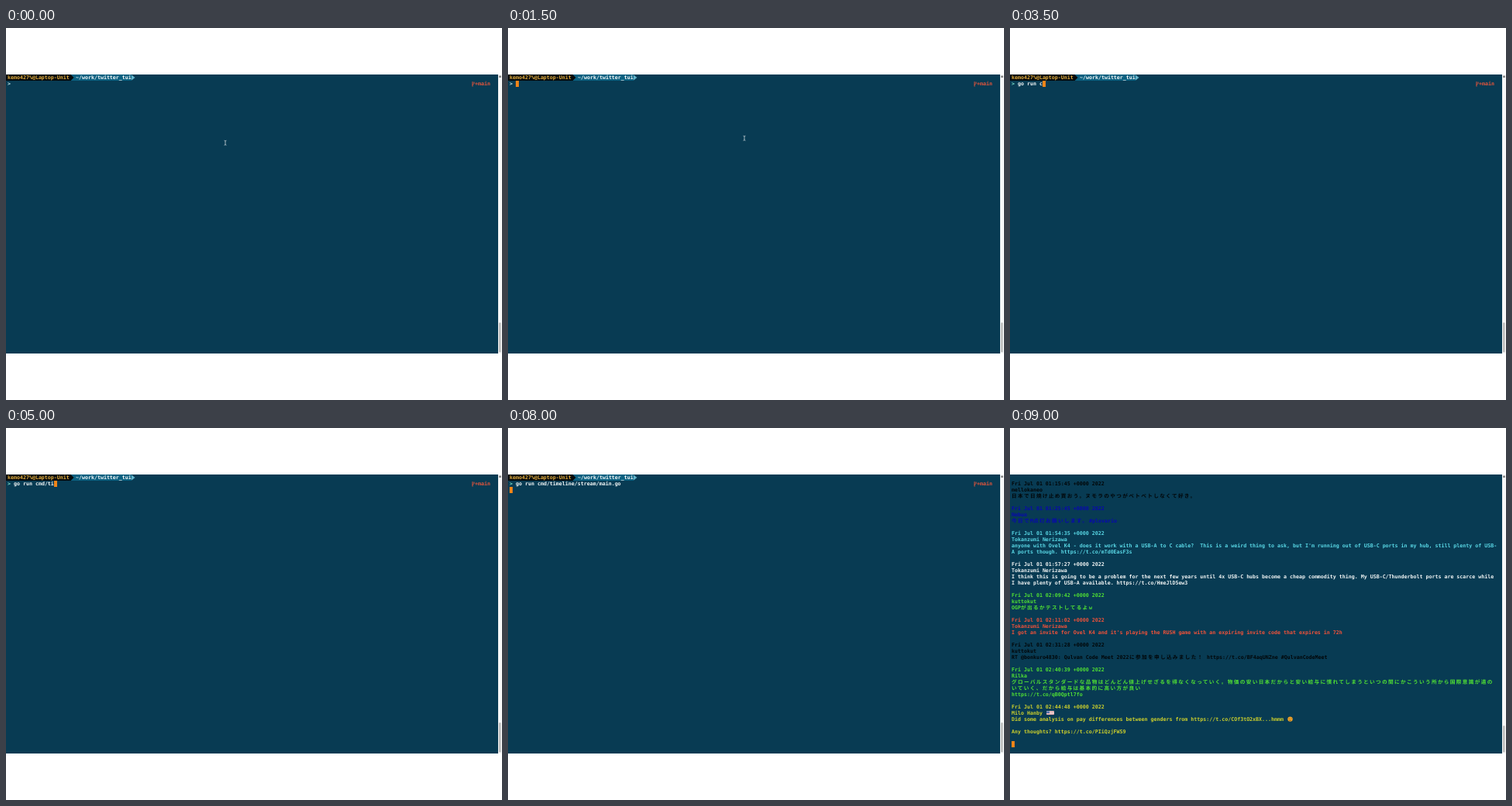
An HTML page for the animation above (9.5 s loop, 640 px wide and 480 px high).

```html
<!DOCTYPE html>
<html lang="ja">
<head>
<meta charset="utf-8">
<title>Terminal timeline</title>
<style>
  html, body { margin: 0; width: 100%; height: 100%; overflow: hidden; background: #fff; }
  svg { display: block; width: 640px; height: 480px; }
  text {
    font: bold 6.644px "DejaVu Sans Mono", "Noto Sans CJK JP", monospace;
    white-space: pre;
    text-rendering: geometricPrecision;
  }
  .wide { font-family: "Noto Sans CJK JP", "Noto Sans CJK", sans-serif; letter-spacing: 1.356px; }
</style>
</head>
<body>
<svg id="stage" viewBox="0 0 640 480" xmlns="http://www.w3.org/2000/svg">
  <rect width="640" height="480" fill="#fff"/>
  <rect y="60" width="635" height="360" fill="#083b53"/>
  <rect x="635" y="60" width="5" height="360" fill="#f8f8f8"/>
  <rect x="636.2" y="61.5" width="2.6" height="2.6" rx=".6" fill="#777"/>
  <rect id="thumb" x="636" width="2.6" rx="1.3" fill="#bcbcbc"/>
  <g id="shell">
    <path d="M84 60H162V68H84Z" fill="#0b6080"/>
    <path d="M162 60.4L166.5 64L162 67.6Z" fill="#62b4cb"/>
    <path d="M0 60H83.5L87.5 64L83.5 68H0Z" fill="#050a0c"/>
    <path d="M602 69.2V75.6M604 69.6V71.4L602 73.4" fill="none" stroke="#e4553c" stroke-width="1"/>
  </g>
  <g id="feed">
    <g id="flag">
      <rect x="47" y="365" width="10" height="5" rx="1" fill="#eee"/>
      <path d="M47 365.4H51V368H47Z" fill="#5570a8"/>
      <path d="M51 366.3H57M47 369H57" stroke="#cf5560" stroke-width=".8"/>
    </g>
    <g id="face">
      <circle cx="361.5" cy="375.6" r="3.2" fill="#f0a52c"/>
      <path d="M359.8 374.8h1M362.4 374.8h1M360.2 377.2h2.4" stroke="#71430d" stroke-width=".7"/>
    </g>
  </g>
  <rect id="cursor" width="4" height="8" fill="#f08418"/>
  <path id="mouse" d="M-1.4-3Q0-3 0-2Q0-3 1.4-3M0-2V2M-1.4 3Q0 3 0 2Q0 3 1.4 3" fill="none" stroke="#b9c8cd" stroke-width=".9"/>
</svg>
<script>
const NS = 'http://www.w3.org/2000/svg';
const $ = id => document.getElementById(id);
const STEP = 500, LOOP = 9500, CELL = 4, ROW = 8;
const cellX = col => 2 + col * CELL;
const rowY = row => 60 + row * ROW;

function add(parent, tag, attrs) {
  const node = document.createElementNS(NS, tag);
  for (const key in attrs) node.setAttribute(key, attrs[key]);
  return parent.appendChild(node);
}

// Full-width characters take two cells, all others one.
function print(parent, row, col, str, fill) {
  const line = add(parent, 'text', { y: rowY(row) + 6.4, fill });
  for (const run of str.match(/[\u3000-\uffef]+|[^\u3000-\uffef]+/g) || []) {
    const wide = run.charCodeAt(0) >= 0x3000;
    const span = add(line, 'tspan', { x: cellX(col) });
    if (wide) span.setAttribute('class', 'wide');
    span.textContent = run;
    col += run.length * (wide ? 2 : 1);
  }
  return line;
}

const black = '#020608', blue = '#0808b0', cyan = '#58d6e4', white = '#f0f4f4',
      green = '#50e034', red = '#f0523a', yellow = '#cdd02c';

const posts = [
  [1, black, '01:15:45', 'mellokaneo', '日本で日焼け止め買おう。ヌモラのやつがベトベトしなくて好き。'],
  [5, blue, '01:25:45', 'Nebuo', '今日でM点灯お願いします。#plovario'],
  [9, cyan, '01:54:35', 'Tokanzumi Nerizawa',
    "anyone with Ovel K4 - does it work with a USB-A to C cable?  This is a weird thing to ask, but I'm running out of USB-C ports in my hub, still plenty of USB-",
    'A ports though. https://t.co/mTd0EasF3s'],
  [14, white, '01:57:27', 'Tokanzumi Nerizawa',
    'I think this is going to be a problem for the next few years until 4x USB-C hubs become a cheap commodity thing. My USB-C/Thunderbolt ports are scarce while',
    'I have plenty of USB-A available. https://t.co/HmeJlD5ew3'],
  [19, green, '02:09:42', 'kuttokut', 'OGPが出るかテストしてるよw'],
  [23, red, '02:11:02', 'Tokanzumi Nerizawa',
    "I got an invite for Ovel K4 and it's playing the RUSH game with an expiring invite code that expires in 72h"],
  [27, black, '02:31:28', 'kuttokut',
    'RT @bonkuro4830: Qulvan Code Meet 2022に参加を申し込みました！ https://t.co/BF4aqUNZne #QulvanCodeMeet'],
  [31, green, '02:40:39', 'Rilka',
    'グローバルスタンダードな品物はどんどん値上げせざるを得なくなっていく。物価の安い日本だからと安い給与に慣れてしまうといつの間にかこういう所から国際意識が遠の',
    'いていく、だから給与は基本的に高い方が良い',
    'https://t.co/qB0Qptl7fo'],
  [37, yellow, '02:44:48', 'Milo Hanby',
    'Did some analysis on pay differences between genders from https://t.co/COf3tO2xBX...hmmm',
    '', 'Any thoughts? https://t.co/PIiQzjFWS9'],
];

for (const [row, color, time, ...lines] of posts)
  [`Fri Jul 01 ${time} +0000 2022`, ...lines].forEach((s, i) => print($('feed'), row + i, 0, s, color));

print($('shell'), 0, 0, 'kemo427%@Laptop-Unit', '#e6ad3c');
print($('shell'), 0, 22, '~/work/twitter_tui', '#f4f8f8');
print($('shell'), 1, 150.75, '+main', '#e4553c');
const prompt = print($('shell'), 1, 0, '>', '#c9f0f0');
const input = print($('shell'), 1, 2, ' ', '#f4f8f8').firstChild;

const command = 'go run cmd/timeline/stream/main.go';
const typed = [0, 0, 0, 0, 1, 3, 6, 8, 9, 11, 13, 28, 34];
const ENTER = 13, OUTPUT = 17;
const cursorOff = new Set([0, 2, 13, 15]);

const show = (node, on) => node.setAttribute('visibility', on ? 'visible' : 'hidden');
const move = (node, x, y) => node.setAttribute('transform', `translate(${x} ${y})`);

function draw(ms) {
  const step = Math.floor(ms % LOOP / STEP);
  const output = step >= OUTPUT, entered = step >= ENTER;
  const count = typed[Math.min(step, ENTER - 1)];

  show($('shell'), !output);
  show($('feed'), output);
  input.textContent = command.slice(0, count);
  prompt.setAttribute('fill', count ? '#7fe6d0' : '#c9f0f0');

  const [col, row] = output ? [0, 43] : entered ? [0, 2] : [2 + count, 1];
  move($('cursor'), cellX(col), rowY(row));
  show($('cursor'), !cursorOff.has(step));

  show($('mouse'), step < 4);
  move($('mouse'), step ? 305 : 283, step ? 142.2 : 148.2);

  const top = output ? 384 : 380;
  $('thumb').setAttribute('y', top);
  $('thumb').setAttribute('height', 418.5 - top);
}

const start = performance.now();
function tick() {
  draw(performance.now() - start);
  requestAnimationFrame(tick);
}
tick();
</script>
</body>
</html>
```
